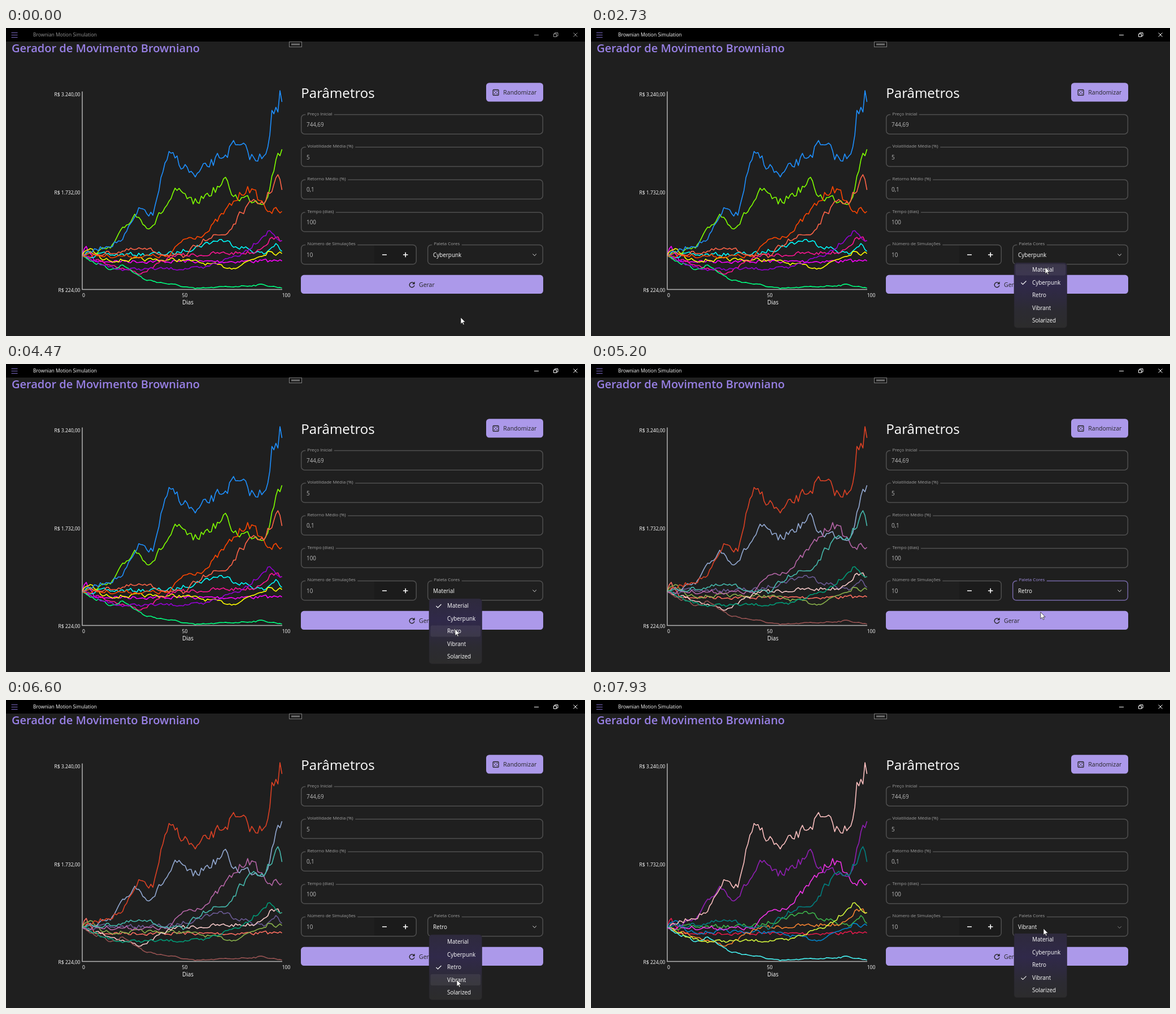
An HTML page for the animation above (8 s loop, 1025x546 px).

```html
<!DOCTYPE html>
<html lang="pt">
<head>
<meta charset="utf-8">
<title>Brownian Motion Simulation</title>
<style>
  html, body { margin: 0; width: 100%; height: 100%; overflow: hidden; background: #1f1f1f; }
  svg { display: block; width: 100%; height: 100%; }
  text { font: 9.9px "Open Sans", sans-serif; fill: #fff; }
  .axis text { font-size: 8.55px; }
  .end { text-anchor: end; }
  .mid { text-anchor: middle; }
  .field rect { fill: none; stroke: #4f4f4f; stroke-width: 1.5; }
  .field .label { font-size: 7.9px; fill: #a0a0a0; stroke: #1f1f1f; stroke-width: 8px; paint-order: stroke; }
  .field .value { fill: #b8b8b8; }
  .field .picked { fill: #fff; }
  .focus rect { stroke: #7568a6; }
  .focus .label { fill: #a18fe0; }
  .button rect { fill: #ac99ea; }
  .button text { font-size: 10.5px; fill: #242424; }
  .button .dice { fill: none; stroke: #242424; stroke-width: 1.3; }
  .line { fill: none; stroke-width: 1.6; stroke-linejoin: round; }
  .icon { fill: none; stroke: #fff; }
</style>
</head>
<body>
<svg viewBox="0 0 1025 546">
  <defs>
    <linearGradient id="acrylic" gradientUnits="userSpaceOnUse" x1="0" y1="414" x2="0" y2="531">
      <stop offset="0" stop-color="#2e2a3c"/>
      <stop offset=".36" stop-color="#30294a"/>
      <stop offset=".75" stop-color="#2c2b32"/>
      <stop offset="1" stop-color="#2c2c2c"/>
    </linearGradient>
    <clipPath id="below"><rect x="740" y="414" width="110" height="132"/></clipPath>
  </defs>

  <rect width="1025" height="546" fill="#1f1f1f"/>
  <rect width="1025" height="24"/>
  <path class="icon" style="stroke:#7f6cc9" d="M9.5 8.5h11M9.5 12.5h11M9.5 16.5h11"/>
  <g id="chrome">
    <text x="48" y="15.2" style="font-size:8.5px">Brownian Motion Simulation</text>
    <path class="icon" d="M935 12.5h8M969.5 10.5h5v5h-5zM971.5 10.5v-2h5.5v5.5h-2M1004.5 8.5l7 7M1011.5 8.5l-7 7"/>
  </g>
  <rect x="501.5" y="24.5" width="22" height="9" fill="#181818" stroke="#7d7d7d"/>
  <rect x="505" y="27.5" width="15" height="3" fill="#6f6f6f"/>
  <text x="10" y="43" style="font-size:20px;font-weight:600;fill:#9880e5">Gerador de Movimento Browniano</text>

  <g id="lines"></g>
  <g class="axis">
    <path d="M135 112.5V463.5H489" fill="none" stroke="#b4b4b4" stroke-width="1.5"/>
    <text class="end" x="131.5" y="120.7">R$ 3.240,00</text>
    <text class="end" x="131.5" y="294.7">R$ 1.732,00</text>
    <text class="end" x="131.5" y="468.2">R$ 224,00</text>
    <text class="mid" x="137.5" y="477.2">0</text>
    <text class="mid" x="316.5" y="477.2">50</text>
    <text class="mid" x="496" y="477.2">100</text>
    <text class="mid" x="322" y="489.5" style="font-size:9.9px">Dias</text>
  </g>

  <text x="522.3" y="123.7" style="font-size:24.1px">Parâmetros</text>
  <g class="button">
    <rect x="850" y="97.2" width="101" height="33.3" rx="5.5"/>
    <rect class="dice" x="862.2" y="109.5" width="9.8" height="9.8" rx="1"/>
    <path d="M864.8 112h0M869.4 112h0M867.1 114.4h0M864.8 116.8h0M869.4 116.8h0" stroke="#242424" stroke-width="1.7" stroke-linecap="round"/>
    <text x="880.3" y="118.2">Randomizar</text>
    <rect x="522" y="437.8" width="429" height="33.3" rx="5.5"/>
    <path d="M721.8 452.2a4.4 4.4 0 1 0 1.2 4" fill="none" stroke="#242424" stroke-width="1.4"/>
    <path d="M723.6 449.6v4.6h-4.6z" fill="#242424"/>
    <text x="731" y="459">Gerar</text>
  </g>
  <path d="M652 385.5h70q4 0 4 5v22q0 5-4 5h-70z" fill="#1b1b1b"/>
  <g id="fields"></g>
  <path class="icon" stroke-width="1.6" d="M666 402h8M703 402h8.5M707.25 397.7v8.6"/>
  <path id="chevron" class="icon"/>

  <g id="menu" clip-path="url(#below)">
    <rect id="panel" x="749" width="93.5" height="115.5" rx="5" fill="url(#acrylic)" stroke="#252429" stroke-width=".6"/>
    <g id="items">
      <rect id="hover" x="751.5" width="88.5" height="20" rx="3" fill="#fff" opacity=".065"/>
      <path id="check" class="icon" stroke-width="1.1" d="M761.5 0l3 3l6-6"/>
    </g>
  </g>
  <path id="cursor" d="M0 0V11.7L2.7 9.2L4.5 13.3L6.3 12.5L4.5 8.5H8.2Z" fill="#fff" stroke="#111" stroke-width=".7"/>
</svg>

<script>
const LOOP = 8000, STEP = 1000 / 15;
const $ = id => document.getElementById(id);
const add = (id, markup) => $(id).insertAdjacentHTML("beforeend", markup);
const clamp = v => Math.max(0, Math.min(1, v));
const mix = (a, b, p) => a + (b - a) * p;

// ---- chart ----
const START = 403, FLOOR = 463, ZERO = 489;   // y of the first price, the axis and price 0
let seed = 7;
const noise = () => (seed = seed * 16807 % 2147483647) / 2147483647 * 2 - 1;

// A random walk tied to a few [day, y] knots; its jitter is proportional to the price.
function walk(...knots) {
  let a = [0, START], drift = 0, d = `M135 ${START}`;
  for (const b of knots) {
    for (let day = a[0] + 1; day <= b[0]; day++) {
      const y = mix(a[1], b[1], (day - a[0]) / (b[0] - a[0]));
      drift = day === b[0] ? 0 : drift * .4 + noise() * (ZERO - y) * .04;
      d += `L${(135 + day * 3.571).toFixed(1)} ${Math.min(FLOOR, y + drift).toFixed(1)}`;
    }
    a = b;
  }
  add("lines", `<path class="line" d="${d}"/>`);
}

walk([2, 387], [6, 413], [60, 414], [99, 413]);
walk([45, 400], [68, 375], [90, 401], [96, 382], [99, 396]);
walk([4, 391], [10, 411], [50, 411], [75, 426], [92, 396], [99, 400]);
walk([29, 436], [45, 404], [86, 397], [94, 371], [99, 377]);
walk([14, 390], [26, 330], [34, 354], [47, 288], [55, 312], [72, 271], [75, 299], [91, 306], [97, 222], [99, 215]);
walk([13, 428], [20, 420], [31, 446], [56, 462], [90, 455], [99, 461]);
walk([43, 405], [50, 375], [62, 362], [82, 281], [93, 325], [99, 325]);
walk([17, 428], [60, 426], [80, 398], [92, 360], [99, 377]);
walk([20, 375], [29, 320], [35, 332], [40, 255], [44, 222], [56, 264], [76, 207], [87, 236], [92, 211], [94, 146], [97, 149], [98, 111], [99, 131]);
walk([30, 392], [50, 407], [60, 374], [72, 364], [81, 318], [91, 306], [97, 260], [99, 287]);

const palettes = {
  Cyberpunk: "#f0f #0ff #ff0 #ff1493 #7fff00 #00ff7f #ff4500 #9400d3 #1e90ff #ff6347",
  Retro: "#ff6f61 #6b5b95 #88b04b #f7cac9 #92a8d1 #955251 #b565a7 #009b77 #dd4124 #45b8ac",
  Vibrant: "#e6194b #3cb44b #0082c8 #f58231 #911eb4 #46f0f0 #f032e6 #d2f53c #fabebe #008080"
};
const lines = [...$("lines").children];
function paint(name) {
  palettes[name].split(" ").forEach((c, i) => lines[i].setAttribute("stroke", c));
}

// ---- form ----
function field(row, x, w, label, value, id = "", cls = "") {
  const y = 153.6 + row * 57.7;
  add("fields", `<g class="field" id="${id}">
    <rect x="${x + .7}" y="${y}" width="${w - 1.4}" height="34.3" rx="6"/>
    <text class="label" x="${x + 11.5}" y="${y + 1}">${label}</text>
    <text class="value ${cls}" x="${x + 10}" y="${y + 21.3}">${value}</text></g>`);
}
field(0, 522, 429, "Preço Inicial", "744,69");
field(1, 522, 429, "Volatilidade Média (%)", "5");
field(2, 522, 429, "Retorno Médio (%)", "0,1");
field(3, 522, 429, "Tempo (dias)", "100");
field(4, 522, 205, "Número de Simulações", "10");
field(4, 746, 205, "Paleta Cores", "", "picker", "picked");
const picked = $("picker").querySelector(".value");

const names = ["Material", "Cyberpunk", "Retro", "Vibrant", "Solarized"];
const ROW = 22.5, TOP = 428.5;
names.forEach((n, i) => add("items", `<text x="781" y="${TOP + 3.6 + i * ROW}">${n}</text>`));

// ---- timeline ----
const menus = [
  { open: 1665, close: 2865, pick: "Material" },
  { open: 3665, close: 4665, pick: "Retro" },
  { open: 5665, close: 6665, pick: "Vibrant" },
  { open: 7730, close: Infinity }
];

// Each move: start, end, and the point it leads to.
const moves = [
  [200, 1067, 889, 431], [1067, 1467, 899, 403], [1867, 2600, 804, 424], [2930, 3333, 804, 404],
  [3800, 4467, 795, 470], [4970, 5467, 797, 405], [5800, 6400, 798, 496], [7067, 7533, 801, 405]
];
function pointer(t) {
  let x = 805, y = 513;
  for (const [from, to, nx, ny] of moves) {
    const p = clamp((t - from) / (to - from));
    x = mix(x, nx, p);
    y = mix(y, ny, p);
  }
  return [x, y];
}

function drawMenu(t, menu, value, y) {
  const age = menu ? t - menu.open : 0;
  const visible = age > 108;
  $("menu").style.display = visible ? "" : "none";
  if (!visible) return;
  const shift = -60 * (1 - clamp((age - 108) / 128)) ** 2;
  const row = Math.floor((y - TOP) / ROW + .5);
  const hovered = !shift && y > 417 && row >= 0 && row < names.length;
  $("menu").setAttribute("opacity", clamp(1 - (t - menu.close) / 83));
  $("panel").setAttribute("y", 416 + shift);
  $("items").setAttribute("transform", `translate(0 ${shift})`);
  $("hover").style.display = hovered ? "" : "none";
  $("hover").setAttribute("y", TOP - 10 + row * ROW);
  $("check").setAttribute("transform", `translate(0 ${TOP + .5 + names.indexOf(value) * ROW})`);
}

function draw(t) {
  const [x, y] = pointer(t);
  const done = menus.filter(m => t >= m.close);
  const value = done.length ? done[done.length - 1].pick : "Cyberpunk";
  const next = menus[done.length];
  const menu = menus.find(m => t >= m.open && t < m.close + 83);
  const over = y > 384 && y < 419;

  $("chrome").setAttribute("opacity", t < menus[0].open ? .6 : 1);
  paint(palettes[value] ? value : "Cyberpunk");
  picked.textContent = value;
  $("picker").classList.toggle("focus", done.length > 0 && t < next.open + 170);
  $("chevron").setAttribute("d", `M932.5 ${over ? 401.3 : 400.5}l3.2 3.2l3.2-3.2`);
  $("chevron").setAttribute("opacity", over ? .45 : .85);
  drawMenu(t, menu, value, y);
  $("cursor").setAttribute("transform", `translate(${x} ${y})`);
}

// The screen refreshes 15 times a second.
function tick() {
  const t = performance.now() % LOOP;
  draw(Math.floor((t + 4) / STEP) * STEP);
  requestAnimationFrame(tick);
}
tick();
</script>
</body>
</html>
```
